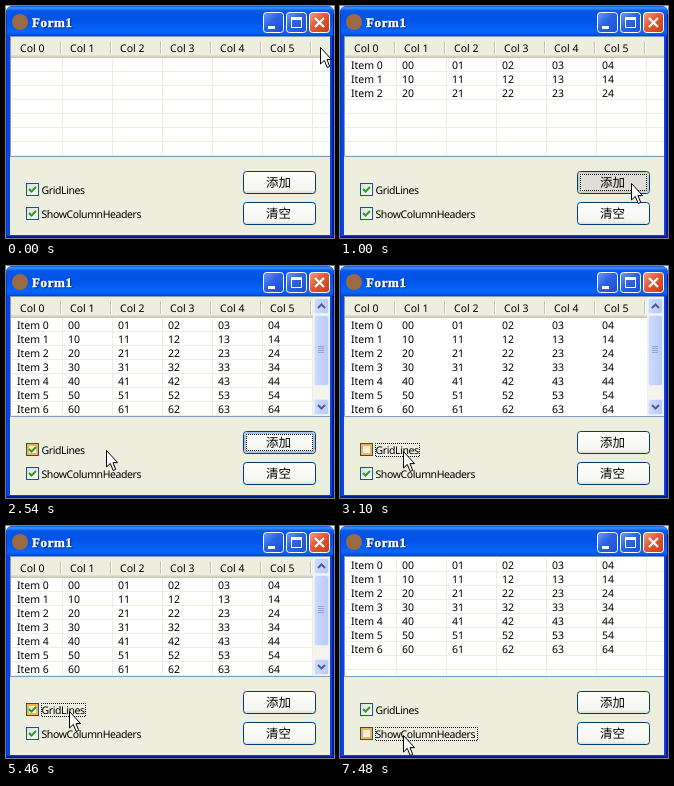
Recreate the animation shown at these times as an HTML page. Size 328x232 px, loop 8 s.

```html
<!DOCTYPE html>
<html lang="zh">
<head>
<meta charset="utf-8">
<title>Form1</title>
<style>
html, body { margin: 0; width: 100%; height: 100%; overflow: hidden; background: #fff; }
svg { display: block; width: 328px; height: 232px; }
text { font: 10.5px "Noto Sans", sans-serif; fill: #000; text-rendering: geometricPrecision; }
.title { font: bold 13px "Liberation Serif", serif; letter-spacing: .6px; fill: #fff; stroke: #fff; stroke-width: .4; }
.label { letter-spacing: -.4px; }
.btn text { font: 12.5px "Noto Sans CJK SC", "Noto Sans CJK", sans-serif; text-anchor: middle; }
.face { fill: url(#face); stroke: #003c74; }
.ring { fill: none; stroke: none; stroke-width: 2; }
.focus { fill: none; stroke: #000; stroke-dasharray: 1 1; stroke-dashoffset: .5; visibility: hidden; }
.focused .focus { visibility: visible; }
.btn.focused .ring { stroke: #a6c3f0; }
.btn.hot .ring { stroke: #f8c35c; }
.btn.down .face { fill: #dfded6; }
.btn.down .ring { stroke: #d0cec4; }
.box { fill: url(#box); stroke: #1c5180; }
.check.hot .ring { stroke: #f6b44a; }
.check.down .box { fill: #d5d4cb; }
.tick { fill: none; stroke: #21a121; stroke-width: 2; }
.grid path { stroke: #edeedd; fill: none; }
</style>
</head>
<body>
<svg viewBox="0 0 328 232" xmlns="http://www.w3.org/2000/svg">
  <defs>
    <linearGradient id="bar" x2="0" y2="1">
      <stop offset="0" stop-color="#0b50d0"/><stop offset=".06" stop-color="#3c92fb"/>
      <stop offset=".16" stop-color="#0458e8"/><stop offset=".45" stop-color="#0252e6"/>
      <stop offset=".85" stop-color="#0565fb"/><stop offset=".94" stop-color="#0459ee"/>
      <stop offset="1" stop-color="#033fc0"/>
    </linearGradient>
    <linearGradient id="face" x2="0" y2="1">
      <stop offset="0" stop-color="#fff"/><stop offset=".85" stop-color="#f5f5f0"/>
      <stop offset="1" stop-color="#dcd8cc"/>
    </linearGradient>
    <linearGradient id="box" x2="1" y2="1">
      <stop offset="0" stop-color="#dcdcd7"/><stop offset="1" stop-color="#fff"/>
    </linearGradient>
    <linearGradient id="blue" x2="1" y2="1">
      <stop offset="0" stop-color="#6f9bf5"/><stop offset=".45" stop-color="#2c62e4"/>
      <stop offset="1" stop-color="#1a50cf"/>
    </linearGradient>
    <linearGradient id="red" x2="1" y2="1">
      <stop offset="0" stop-color="#f0a088"/><stop offset=".45" stop-color="#e25a34"/>
      <stop offset="1" stop-color="#c43c14"/>
    </linearGradient>
    <linearGradient id="thumb">
      <stop offset="0" stop-color="#cddbfe"/><stop offset="1" stop-color="#b9cafa"/>
    </linearGradient>
    <clipPath id="view"><rect x="5" y="31" width="319" height="119"/></clipPath>
  </defs>

  <path d="M0 232V7Q0 0 7 0H321Q328 0 328 7V232Z" fill="#0845e0"/>
  <path d="M0 30V7Q0 0 7 0H321Q328 0 328 7V30Z" fill="url(#bar)"/>
  <path d="M.5 8V232" stroke="#0831d9"/>
  <path d="M327.5 8V231.5H0" fill="none" stroke="#00138c"/>
  <path d="M326.5 30V230.5H1" fill="none" stroke="#001ea0"/>
  <rect x="4" y="30" width="320" height="199" fill="#edeedd"/>
  <circle cx="14" cy="16" r="8" fill="#9c6a42"/>
  <text class="title" x="27" y="22" style="fill:#0a2a80;stroke:#0a2a80">Form1</text>
  <text class="title" x="26" y="21">Form1</text>
  <g stroke="#fff">
    <rect x="257.5" y="6.5" width="20" height="20" rx="3" fill="url(#blue)"/>
    <rect x="280.5" y="6.5" width="20" height="20" rx="3" fill="url(#blue)"/>
    <rect x="303.5" y="6.5" width="20" height="20" rx="3" fill="url(#red)"/>
    <path d="M262 21.5H269" stroke-width="3"/>
    <path d="M285.5 12V21.5H295.5V12" fill="none"/>
    <path d="M285 12.5H296" stroke-width="3"/>
    <path d="M309 12L318 21M318 12L309 21" stroke-width="2.2"/>
  </g>

  <rect x="4" y="30" width="320" height="121" fill="#fff"/>
  <g clip-path="url(#view)">
    <g id="body">
      <g class="grid" id="grid"><path id="cols"/><path id="lines"/></g>
      <g id="rows"></g>
    </g>
    <g id="header">
      <rect x="5" y="31" width="319" height="21" fill="#edeedd"/>
      <path d="M5 49.5H324" stroke="#e2decd"/>
      <path d="M5 50.5H324" stroke="#d6d2c2"/>
      <path d="M5 51.5H324" stroke="#cbc7b8"/>
    </g>
    <g id="scroll">
      <rect x="307" y="31" width="17" height="119" fill="#f4f3ee"/>
      <g fill="url(#thumb)" stroke="#e4ecfd">
        <rect x="308.5" y="32.5" width="14" height="15" rx="2"/>
        <rect x="308.5" y="49.5" width="14" height="70" rx="2"/>
        <rect x="308.5" y="133.5" width="14" height="15" rx="2"/>
      </g>
      <path d="M312 42L315.5 38.5L319 42M312 139L315.5 142.5L319 139" fill="none" stroke="#4d6185" stroke-width="2"/>
      <path d="M312 80.5H318M312 82.5H318M312 84.5H318M312 86.5H318" stroke="#8ca6e6"/>
    </g>
  </g>
  <path d="M4.5 31V150.5H324M4 30.5H324" fill="none" stroke="#7f9db9"/>

  <g id="controls"></g>
  <path id="cursor" d="M.5 .5V17L4.3 13.4L7.2 20.5L9.7 19.4L7 12.6H11.6Z" fill="#fff" stroke="#000"/>
</svg>
<script>
const LOOP = 8000, ROW = 14, HEADER = 20;
const $ = id => document.getElementById(id);

// Each click is [press, release].
const addClicks = [[500, 560], [690, 750], [820, 940], [1000, 1060], [1190, 1320], [1380, 1510], [1510, 1570]];
const gridClicks = [[3040, 3100], [3360, 3420], [3880, 3940], [5000, 5060]];
const headClicks = [[6100, 6230], [6760, 6820], [7420, 7480]];

// Pointer positions: [time, x, y], held until the next one.
const pointer = [
  [0, 314, 41], [60, 313, 62], [120, 307, 104], [180, 299, 146], [240, 293, 172], [300, 291, 177],
  [2300, 281, 178], [2360, 234, 181], [2420, 184, 183], [2480, 142, 184], [2540, 100, 184],
  [2600, 82, 185], [2660, 71, 185], [2720, 65, 185], [2780, 63, 185],
  [5520, 63, 189], [5580, 63, 196], [5640, 63, 204], [5700, 63, 209]
];

const text = (x, y, s, cls = "") => `<text class="${cls}" x="${x}" y="${y}">${s}</text>`;
const frame = (cls, x, y, w, h, r = 0) =>
  `<rect class="${cls}" x="${x + .5}" y="${y + .5}" width="${w - 1}" height="${h - 1}" rx="${r}"/>`;

const button = (id, y, s) => `<g class="btn" id="${id}">${frame("face", 237, y, 73, 23, 3)}
  ${frame("ring", 238.5, y + 1.5, 70, 20, 2)}${frame("focus", 240, y + 3, 67, 17)}${text(272.5, y + 16, s)}</g>`;

const checkbox = (id, y, s, w) => `<g class="check" id="${id}">${frame("box", 20, y, 13, 13)}
  ${frame("ring", 21.5, y + 1.5, 10, 10)}<path class="tick" d="M23 ${y + 6}L25.5 ${y + 8.5}L30 ${y + 4}"/>
  ${frame("focus", 35, y, w, 14)}${text(35.5, y + 11, s, "label")}</g>`;

$("controls").innerHTML = button("add", 165, "添加") + button("clear", 196, "清空") +
  checkbox("gridBox", 177, "GridLines", 45) + checkbox("headBox", 201, "ShowColumnHeaders", 103);

let cols = "", head = "", cells = "";
for (let c = 0; c < 6; c++) {
  const x = 56 + c * 50;
  cols += `M${x + .5} 52V190`;
  head += `<path d="M${x - 1.5} 35V48" stroke="#c7c5b2"/><path d="M${x - .5} 35V48" stroke="#fff"/>` +
    text(14 + c * 50, 46, "Col " + c);
}
for (let r = 0; r < 7; r++) {
  const y = 63 + r * ROW;
  cells += "<g>" + text(11, y, "Item " + r);
  for (let c = 0; c < 5; c++) cells += text(62 + c * 50, y, `${r}${c}`);
  cells += "</g>";
}
$("cols").setAttribute("d", cols);
$("lines").setAttribute("d", Array.from({ length: 9 }, (_, r) => `M6 ${65.5 + r * ROW}H324`).join(""));
$("header").innerHTML += head;
$("rows").innerHTML = cells;

const show = (el, on) => { el.style.display = on ? "" : "none"; };
const isDown = (clicks, t) => clicks.some(([a, b]) => t >= a && t < b);
const done = (clicks, t) => clicks.filter(c => t >= c[1]).length;

function setControl(id, clicks, t, hot, focused) {
  const list = $(id).classList;
  list.toggle("hot", hot);
  list.toggle("focused", focused);
  list.toggle("down", isDown(clicks, t));
}

function render(t) {
  const [, x, y] = pointer.filter(p => p[0] <= t).pop();
  const count = done(addClicks, t);
  const gridOn = done(gridClicks, t) % 2 === 0;
  const headOn = done(headClicks, t) % 2 === 0;

  $("cursor").setAttribute("transform", `translate(${x} ${y})`);
  [...$("rows").children].forEach((row, r) => show(row, r < count));
  show($("grid"), gridOn);
  show($("header"), headOn);
  show($("scroll"), headOn && count === 7);
  $("body").setAttribute("transform", `translate(0 ${headOn ? 0 : -HEADER})`);

  setControl("add", addClicks, t, x > 237 && y > 165, t >= 500 && t < 3040);
  setControl("gridBox", gridClicks, t, x < 136 && y < 192, t >= 3040 && t < 6100);
  setControl("headBox", headClicks, t, x < 136 && y > 198, t >= 6100);
  show($("gridBox").querySelector(".tick"), gridOn);
  show($("headBox").querySelector(".tick"), headOn);
}

const start = performance.now();
function tick() {
  render((performance.now() - start) % LOOP);
  requestAnimationFrame(tick);
}
tick();
</script>
</body>
</html>
```
